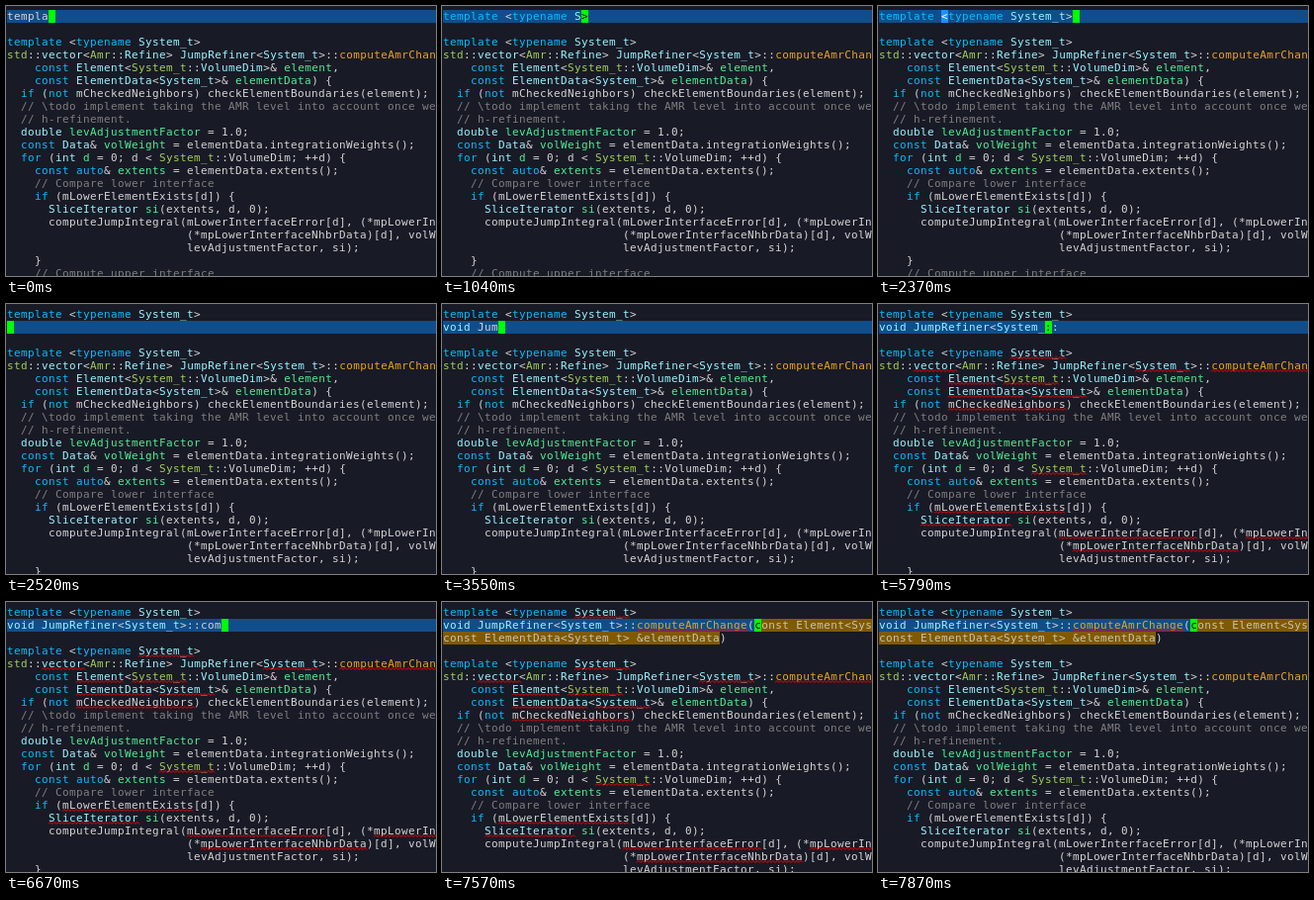
An HTML page that plays this animation: 435x273 px, repeating every 8000 ms.

```html
<!DOCTYPE html>
<html lang="en">
<head>
<meta charset="utf-8">
<title>Typing in a code editor</title>
<style>
html, body { margin: 0; width: 100%; height: 100%; overflow: hidden; background: #181a26; }
#stage { position: relative; width: 435px; height: 273px; overflow: hidden; }
#code {
  position: absolute; left: 1px; top: 4px; width: 434px;
  color: #d4d4d4;
  font: 11px/13px "DejaVu Sans Mono", monospace;
  letter-spacing: calc(7px - .602em);
  white-space: pre;
}
#code div { height: 13px; overflow: hidden; }
#code span { display: inline-block; height: 13px; vertical-align: top; }
#code .line { background: #104e8b; }
#code .keyword { color: #00bfff; }
#code .type { color: #98f5ff; }
#code .variable { color: #4eee94; }
#code .constant { color: #a2cd5a; }
#code .method { color: #eba51c; }
#code .comment { color: #7f7f7f; }
#code .match { background: #1e90ff; color: #fff; }
#code .field { background: #805a00; color: #c8c4b4; }
#code .cursor { background: #0f0; color: #000; width: 7px; }
svg { position: absolute; left: 0; top: 0; }
path { fill: none; stroke: #f00; stroke-width: 1; }
</style>
</head>
<body>
<div id="stage">
  <div id="code"></div>
  <svg width="435" height="273"><path id="waves"/></svg>
</div>
<script>
const LOOP = 8000, CELL = 7, ROW = 13, LEFT = 1, TOP = 4;

// Marks: @type ~variable !constant %method #match |cursor «field»
const body = String.raw`
template <typename @System_t>
!std::@vector<!Amr::@Refine> @JumpRefiner<@System_t>::%computeAmrChange(
    const @Element<!System_t::@VolumeDim>& ~element,
    const @ElementData<@System_t>& ~elementData) {
  if (not mCheckedNeighbors) checkElementBoundaries(element);
  // \todo implement taking the AMR level into account once we
  // h-refinement.
  @double ~levAdjustmentFactor = 1.0;
  const @Data& ~volWeight = elementData.integrationWeights();
  for (@int ~d = 0; d < !System_t::VolumeDim; ++d) {
    const auto& ~extents = elementData.extents();
    // Compare lower interface
    if (mLowerElementExists[d]) {
      @SliceIterator ~si(extents, d, 0);
      computeJumpIntegral(mLowerInterfaceError[d], (*mpLowerInterface
                          (*mpLowerInterfaceNhbrData)[d], volWeight,
                          levAdjustmentFactor, si);
    }
    // Compute upper interface`.split("\n");

const first = "template <typename @System_t>\n";
const owner = first + "void @JumpRefiner";
const full = owner + "<@System_t>::";
const call = full + "%computeAmrChange(|c«onst Element<System_t::VolumeDim> &element,»\n" +
  "«const ElementData<System_t> &elementData»)";

const fileErrors = /vector|Element(Data)?(?=<)|mCheckedNeighbors|System_t|computeAmr\w+|mLowerElementExists|SliceIterator|mLowerInterfaceError|mpLower\w+/g;
const ownerError = { head: /JumpRefiner/g };
const parseErrors = { body: fileErrors };
const callErrors = { head: /(?<=typename )System_t|computeAmrChange/g, body: fileErrors };
const lastError = { head: /computeAmrChange/g };

// [time, text above the function, errors shown]
const steps = [
  [0, "templa|"],
  [150, "templat|"],
  [300, "template|"],
  [1040, "template <typename @S|>"],
  [1190, "template <typename @Sy|>"],
  [1340, "template <typename @Syst|>"],
  [1490, "template <typename @Syste|>"],
  [1630, "template <typename @System|>"],
  [1930, "template <typename @System_|>"],
  [2080, "template <typename @System_t|>"],
  [2220, "template <typename @System_t>|"],
  [2370, "template #<typename @System_t>|"],
  [2520, first + "|"],
  [2670, first + "vo|"],
  [2810, first + "@void|"],
  [2960, first + "@void |"],
  [3260, first + "@void J|"],
  [3410, first + "@void Ju|"],
  [3550, first + "@void Jum|"],
  [4300, owner + "|::"],
  [4450, owner + "<|::"],
  [4750, owner + "<@S|::", ownerError],
  [4900, owner + "<@Sys|::", ownerError],
  [5040, owner + "<@Syst|::", ownerError],
  [5190, owner + "<@System|::", ownerError],
  [5790, owner + "<@System_|::", parseErrors],
  [5940, owner + "<@System_t|::", parseErrors],
  [6080, owner + "<@System_t>|::", parseErrors],
  [6230, full + "|", parseErrors],
  [6380, full + "c|", parseErrors],
  [6520, full + "co|", parseErrors],
  [6670, full + "com|", parseErrors],
  [7570, call, callErrors],
  [7870, call, lastError]
];

const faces = { "@": "type", "~": "variable", "!": "constant", "%": "method", "#": "match", "|": "cursor" };
const token = /(\/\/.*)|«(.*?)»|([@~!%])(\w+)|(#)(<)|(\|)(.?)|\b(template|typename|const|auto|if|not|for)\b|\b(void)\b/g;

const escapeHtml = s => s.replace(/&/g, "&amp;").replace(/</g, "&lt;");
const span = (face, s) => `<span class="${face}">${escapeHtml(s)}</span>`;

function paint(line) {
  let html = "", end = 0;
  for (const m of line.matchAll(token)) {
    const [all, comment, field, mark, name, hash, angle, bar, under, keyword, type] = m;
    html += escapeHtml(line.slice(end, m.index));
    end = m.index + all.length;
    if (comment) html += span("comment", comment);
    else if (field) html += span("field", field);
    else if (keyword) html += span("keyword", keyword);
    else if (type) html += span("type", type);
    else html += span(faces[mark || hash || bar], name || angle || under || " ");
  }
  html += escapeHtml(line.slice(end));
  return `<div${line.includes("|") ? ' class="line"' : ""}>${html}</div>`;
}

function wave(row, col, length) {
  const x = LEFT + col * CELL, y = TOP + row * ROW + 10.5;
  return `M${x} ${y + 2}` + "l2-2 2 2".repeat(Math.round(length * CELL / 4));
}

function show([, text, errors = {}]) {
  const head = text.split("\n"), lines = head.concat(body);
  let d = "";
  lines.forEach((line, row) => {
    const pattern = row < head.length ? errors.head : errors.body;
    if (!pattern) return;
    for (const m of line.replace(/[@~!%#|«»]/g, "").matchAll(pattern))
      d += wave(row, m.index, m[0].length);
  });
  document.getElementById("code").innerHTML = lines.map(paint).join("");
  document.getElementById("waves").setAttribute("d", d);
}

const start = performance.now();
let shown;
function tick() {
  const t = (performance.now() - start) % LOOP;
  const step = steps.findLast(s => s[0] <= t);
  if (step !== shown) show(shown = step);
  requestAnimationFrame(tick);
}
tick();
</script>
</body>
</html>
```
